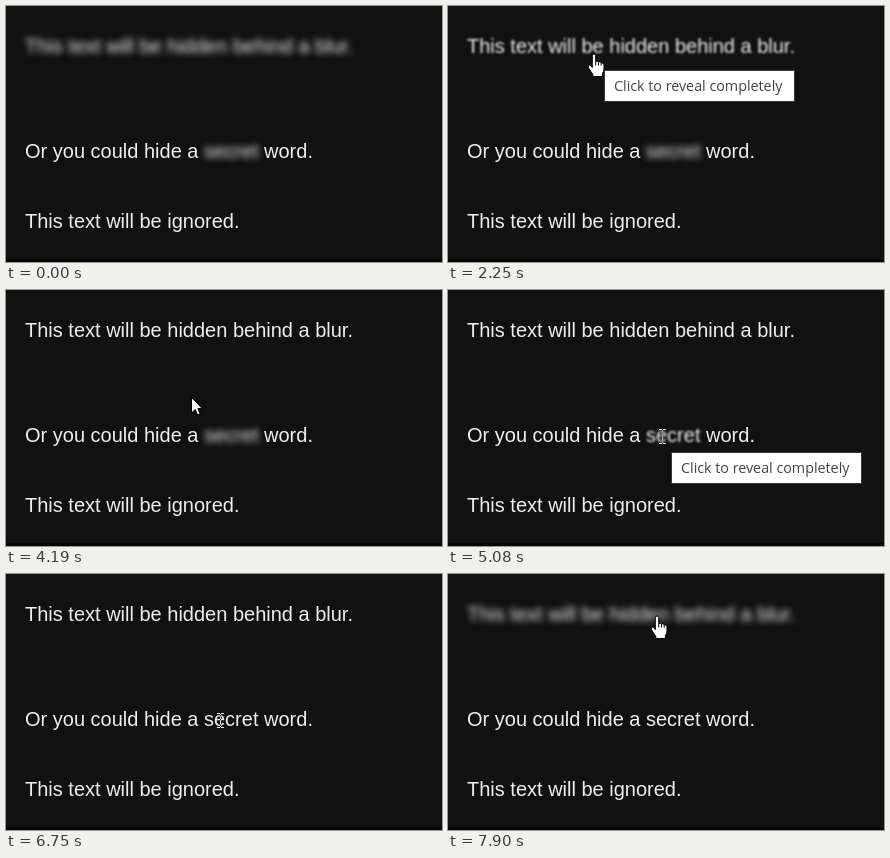
Animation of 436x256 px, one loop 8 s. Source, as an HTML page with a canvas:

```html
<!DOCTYPE html>
<html lang="en">
<head>
<meta charset="utf-8">
<title>Blurred text</title>
<style>
  html, body { margin: 0; width: 100%; height: 100%; overflow: hidden; background: #111; }
  #stage { position: relative; width: 436px; height: 256px; overflow: hidden; background: #111; }
  #stage::after { content: ""; position: absolute; left: 0; bottom: 0; width: 100%; height: 3px; background: #0a0307; }
  .line, #tip { position: absolute; white-space: pre; }
  .line { left: 19px; font: 20px/24px "Liberation Sans", Arial, sans-serif; color: #eee; }
  #secret { display: inline-block; }
  #tip {
    box-sizing: border-box; width: 191px; height: 32px; padding-left: 9px;
    border: 1px solid #3a3a3a; background: #fff; color: #444;
    font: 14.3px/29px "Open Sans", "Noto Sans", sans-serif;
  }
  canvas { position: absolute; left: 0; top: 0; z-index: 1; }
</style>
</head>
<body>
<div id="stage">
  <div class="line" id="hidden" style="top:28px">This text will be hidden behind a blur.</div>
  <div class="line" style="top:133px">Or you could hide a <span id="secret">secret</span> word.</div>
  <div class="line" style="top:203px">This text will be ignored.</div>
  <div id="tip">Click to reveal completely</div>
  <canvas id="pointer" width="436" height="256"></canvas>
</div>
<script>
const LOOP = 8000, FULL = 3, HOVER = 1.2;
const el = id => document.getElementById(id);
const hidden = el('hidden'), secret = el('secret'), tip = el('tip'), canvas = el('pointer');
const ctx = canvas.getContext('2d');

// pointer path: time, x, y
const path = [
  [260, 306, 246], [1050, 141, 107], [1150, 140, 88], [1350, 142, 65], [1540, 145, 51], [1700, 146, 48],
  [3600, 146, 48], [3800, 154, 62], [4390, 201, 130], [4520, 214, 146],
  [6750, 214, 146], [6900, 213, 129], [7330, 210, 54], [7490, 209, 42]
];

// blur changes: start, duration, new radius
const hiddenBlur = [[1540, 330, HOVER], [2990, 240, 0], [7640, 260, FULL]];
const secretBlur = [[4420, 230, HOVER], [5910, 250, 0]];

const tips = [[2250, 2990, 156, 64], [5080, 5910, 223, 162]];
const textBoxes = [[19, 29, 347, 52], [19, 134, 307, 156], [19, 204, 233, 226]];

const arrowShape = new Path2D('M.5 .5V16L4.2 12.5L6.6 18L9.2 17L6.8 11.6H11.3Z');
const handShape = new Path2D(
  'M-1.7 1.8Q-1.7 0 0 0Q1.7 0 1.7 1.8V7.6Q3.2 6.4 4.5 8Q6.2 7 7.2 8.8Q9.8 8.4 10 10.8' +
  'V15Q10 17.5 8.4 19.5V22.5H-1.2V20.2Q-3.4 17.6 -5.6 13.6Q-6.2 11.4 -4.4 11.1Q-3.2 11.1 -1.7 13.6Z');
const slits = new Path2D('M1.7 7.6V11.5M4.5 8V11.5M7.2 8.8V11.8');

function pointerAt(t) {
  const i = path.findIndex(p => p[0] > t);
  if (i < 0) return path[path.length - 1].slice(1);
  const [t0, x0, y0] = path[i - 1], [t1, x1, y1] = path[i];
  const p = (t - t0) / (t1 - t0);
  return [Math.round(x0 + (x1 - x0) * p), Math.round(y0 + (y1 - y0) * p)];
}

function blurAt(t, changes) {
  return changes.reduce((radius, [start, length, to]) => {
    const p = Math.min(1, Math.max(0, (t - start) / length));
    return radius + (to - radius) * (1 - (1 - p) ** 2);
  }, FULL);
}

function setBlur(node, radius) {
  node.style.filter = radius > 0.02 ? `blur(${radius.toFixed(2)}px)` : 'none';
}

function drawShape(shape) {
  ctx.lineWidth = 1;
  ctx.lineJoin = 'round';
  ctx.fillStyle = '#fff';
  ctx.strokeStyle = '#000';
  ctx.fill(shape);
  ctx.stroke(shape);
}

function drawBeam() {
  ctx.fillStyle = '#fff';
  ctx.fillRect(0, -6, 1, 13);
  for (const y of [-7, 7]) {
    ctx.fillRect(-3, y, 3, 1);
    ctx.fillRect(1, y, 3, 1);
  }
}

function drawPointer(t) {
  ctx.clearRect(0, 0, 436, 256);
  if (t < 260) return;
  const [x, y] = pointerAt(t);
  const hand = (t >= 1540 && t < 2990) || t >= 7640;
  const beam = !hand && textBoxes.some(([l, top, r, b]) => x >= l && x <= r && y >= top && y <= b);
  canvas.style.mixBlendMode = beam ? 'difference' : 'normal';
  ctx.save();
  ctx.translate(x, y);
  if (hand) {
    drawShape(handShape);
    ctx.stroke(slits);
  } else if (beam) {
    drawBeam();
  } else {
    drawShape(arrowShape);
  }
  ctx.restore();
}

function draw() {
  const t = performance.now() % LOOP;
  setBlur(hidden, blurAt(t, hiddenBlur));
  setBlur(secret, blurAt(t, secretBlur));
  const shown = tips.find(([from, to]) => t >= from && t < to);
  tip.style.display = shown ? 'block' : 'none';
  if (shown) {
    tip.style.left = shown[2] + 'px';
    tip.style.top = shown[3] + 'px';
  }
  drawPointer(t);
  requestAnimationFrame(draw);
}
draw();
</script>
</body>
</html>
```
